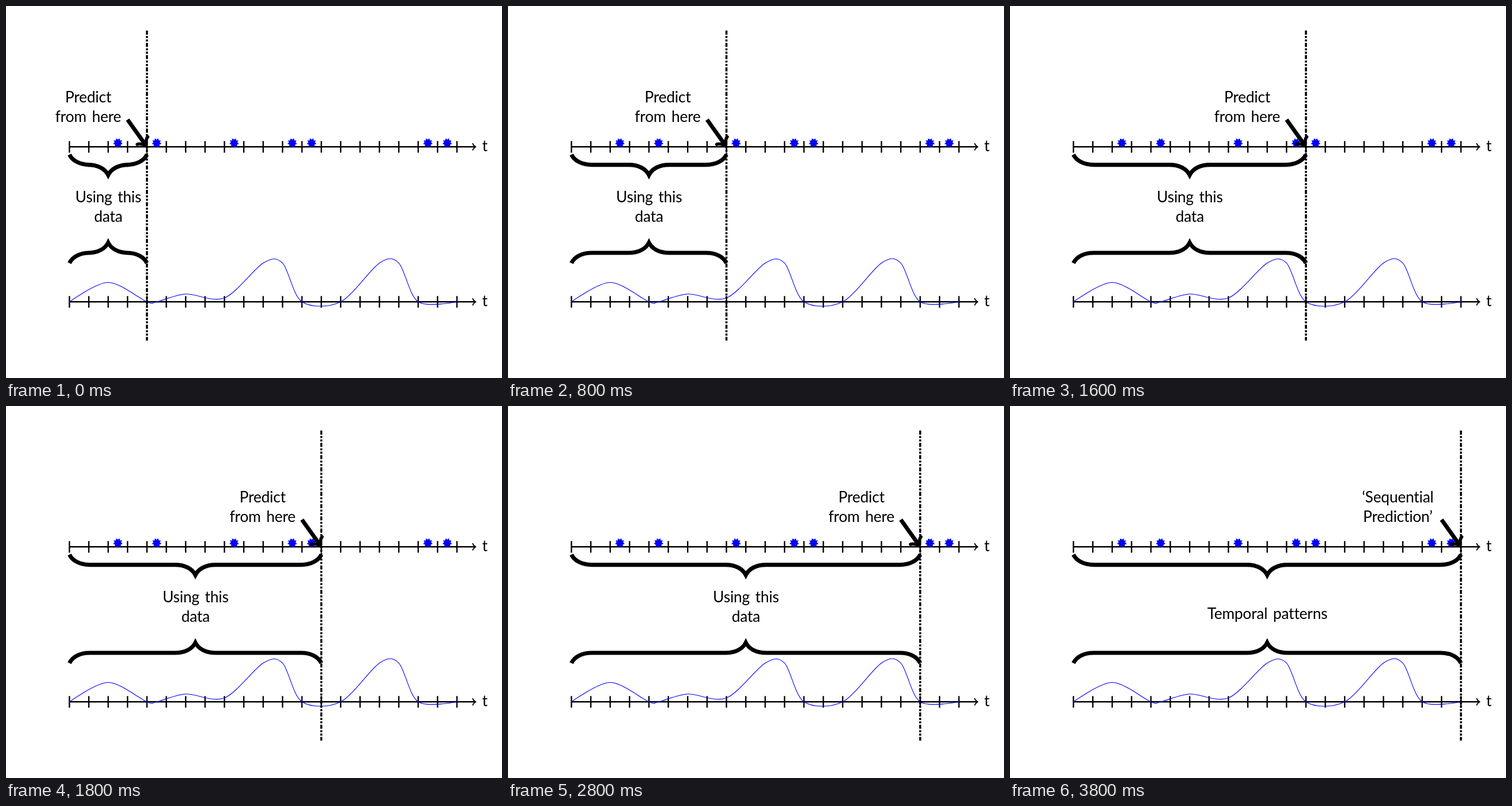
These frames come from a looping animation (864 px wide and 648 px high, 4 s). An HTML page:

```html
<!DOCTYPE html>
<html lang="en">
<head>
<meta charset="utf-8">
<title>Sequential prediction</title>
<style>
  html, body { margin: 0; width: 100%; height: 100%; overflow: hidden; background: #fff; }
  svg { display: block; width: 864px; height: 648px; }
  path { fill: none; stroke: #000; }
  .axis { stroke-width: 2.37; }
  .head { stroke-linecap: round; stroke-linejoin: round; }
  .bold { stroke-width: 7.1; stroke-miterlimit: 10; }
  .curve { stroke: #00f; stroke-width: 1.1; }
  .star { fill: #00f; stroke: none; }
  .now { stroke-width: 3.56; stroke-dasharray: 7.12 2.37 3.56 2.37 3.56 2.37; }
  text {
    font: 26.4px Lato, "Open Sans", sans-serif;
    letter-spacing: -.2px; word-spacing: 3.2px;
    text-anchor: middle; fill: #000;
  }
</style>
</head>
<body>
<svg id="stage" viewBox="0 0 864 648"></svg>
<script>
const LEFT = 110.5, UNIT = 33.75, TOP = 245.3, BASE = 515.3, PT = 2.372;
const STEP = 200, STEPS = 20, LAST = 16;
const stage = document.getElementById('stage');
const px = n => LEFT + n * UNIT;

function add(tag, attrs, parent = stage) {
  const el = document.createElementNS('http://www.w3.org/2000/svg', tag);
  for (const key in attrs) el.setAttribute(key, attrs[key]);
  return parent.appendChild(el);
}
const path = (cls, d, parent) => add('path', { class: cls, d }, parent);
function label(x, y, parent, content = '') {
  const el = add('text', { x, y }, parent);
  el.textContent = content;
  return el;
}

// Arrow whose tip touches (x, y), for a shaft of w points
function arrow(x, y, angle, length, w, parent) {
  const a = (0.28 + 0.3 * w) * PT;
  const reach = (0.21 + 0.625 * w) * PT;
  const g = add('g', { transform: `translate(${x} ${y}) rotate(${angle}) translate(${-reach} 0)` }, parent);
  add('path', { d: `M${reach - length} 0H0`, 'stroke-width': w * PT }, g);
  add('path', {
    class: 'head', 'stroke-width': 0.8 * w * PT,
    d: `M${-3 * a} ${-4 * a}C${-2.75 * a} ${-2.5 * a} 0 ${-a / 4} ${0.75 * a} 0` +
       `C0 ${a / 4} ${-2.75 * a} ${2.5 * a} ${-3 * a} ${4 * a}`
  }, g);
}

function axis(y) {
  arrow(px(21), y, 0, 21 * UNIT, 1);
  let d = '';
  for (let i = 0; i <= 20; i++) d += `M${px(i)} ${y - 10.1}v20.2`;
  path('axis', d);
  label(834.2, y + 8, stage, 't');
}

function star(x, y, points = 9) {
  let d = '';
  for (let i = 0; i < 2 * points; i++) {
    const r = i % 2 ? 5.7 : 8.5, a = Math.PI / 2 + i * Math.PI / points;
    d += `${i ? 'L' : 'M'}${x + r * Math.cos(a)} ${y + r * Math.sin(a)}`;
  }
  path('star', d + 'Z');
}

function smooth(points, tension) {
  const p = points.map(([x, y]) => [px(x), BASE - y * UNIT]);
  const slope = (i, k) => i > 0 && i < p.length - 1 ? tension * (p[i + 1][k] - p[i - 1][k]) : 0;
  let d = 'M' + p[0];
  for (let i = 1; i < p.length; i++) {
    const from = [0, 1].map(k => p[i - 1][k] + slope(i - 1, k));
    const to = [0, 1].map(k => p[i][k] - slope(i, k));
    d += `C${from} ${to} ${p[i]}`;
  }
  return d;
}

// Curly brace from LEFT to x; dir 1 points down, -1 up
function brace(x, y, dir) {
  const a = 15 * PT, mid = (LEFT + x) / 2;
  const at = (base, dx, dy) => `${base + dx * a} ${y + dir * dy * a} `;
  return 'M' + at(LEFT, 0, 0) +
    'C' + at(LEFT, .15, .3) + at(LEFT, .5, .5) + at(LEFT, 1, .5) +
    'L' + at(mid, -1, .5) +
    'C' + at(mid, -.5, .5) + at(mid, -.15, .7) + at(mid, 0, 1) +
    'C' + at(mid, .15, .7) + at(mid, .5, .5) + at(mid, 1, .5) +
    'L' + at(x, -1, .5) +
    'C' + at(x, -.5, .5) + at(x, -.15, .3) + at(x, 0, 0);
}

axis(TOP);
axis(BASE);
[2.5, 4.5, 8.5, 11.5, 12.5, 18.5, 19.5].forEach(n => star(px(n), TOP - 6.75));
path('curve', smooth([
  [0, 0], [2, 1], [4, 0], [4.5, 0], [6, .4], [8, .2], [10, 2], [11, 2],
  [12, 0], [14, 0], [16, 2], [17, 2], [18, 0], [20, 0]
], .1526));

const upper = path('bold', '');
const lower = path('bold', '');
const marker = add('g', {});
path('now', `M0 ${TOP - 6 * UNIT}V${BASE + 2 * UNIT}`, marker);
arrow(0, TOP, Math.atan2(47.3, 33.75) * 180 / Math.PI, 58.1, 3, marker);
const head = [label(0, 168, marker), label(0, 202, marker)];
const note = [label(0, 342), label(0, 376.4), label(0, 371)];

function setText(els, lines, x) {
  els.forEach((el, i) => {
    el.textContent = lines[i];
    el.setAttribute('x', x);
  });
}

let shown = -1;
function draw() {
  const step = Math.floor(performance.now() / STEP) % STEPS;
  if (step !== shown) {
    shown = step;
    const x = px(4 + Math.min(step, LAST));
    marker.setAttribute('transform', `translate(${x} 0)`);
    upper.setAttribute('d', brace(x, TOP + 13.5, 1));
    lower.setAttribute('d', brace(x, BASE - 2 * UNIT, -1));
    if (step > LAST) setText(head, ['‘Sequential', 'Prediction’'], -110);
    else setText(head, ['Predict', 'from here'], -102.3);
    const lines = step < 18 ? ['Using this', 'data', '']
      : ['', '', step < 19 ? 'Learn from temporal patterns' : 'Temporal patterns'];
    setText(note, lines, (LEFT + x) / 2 + .3);
  }
  requestAnimationFrame(draw);
}
draw();
</script>
</body>
</html>
```
